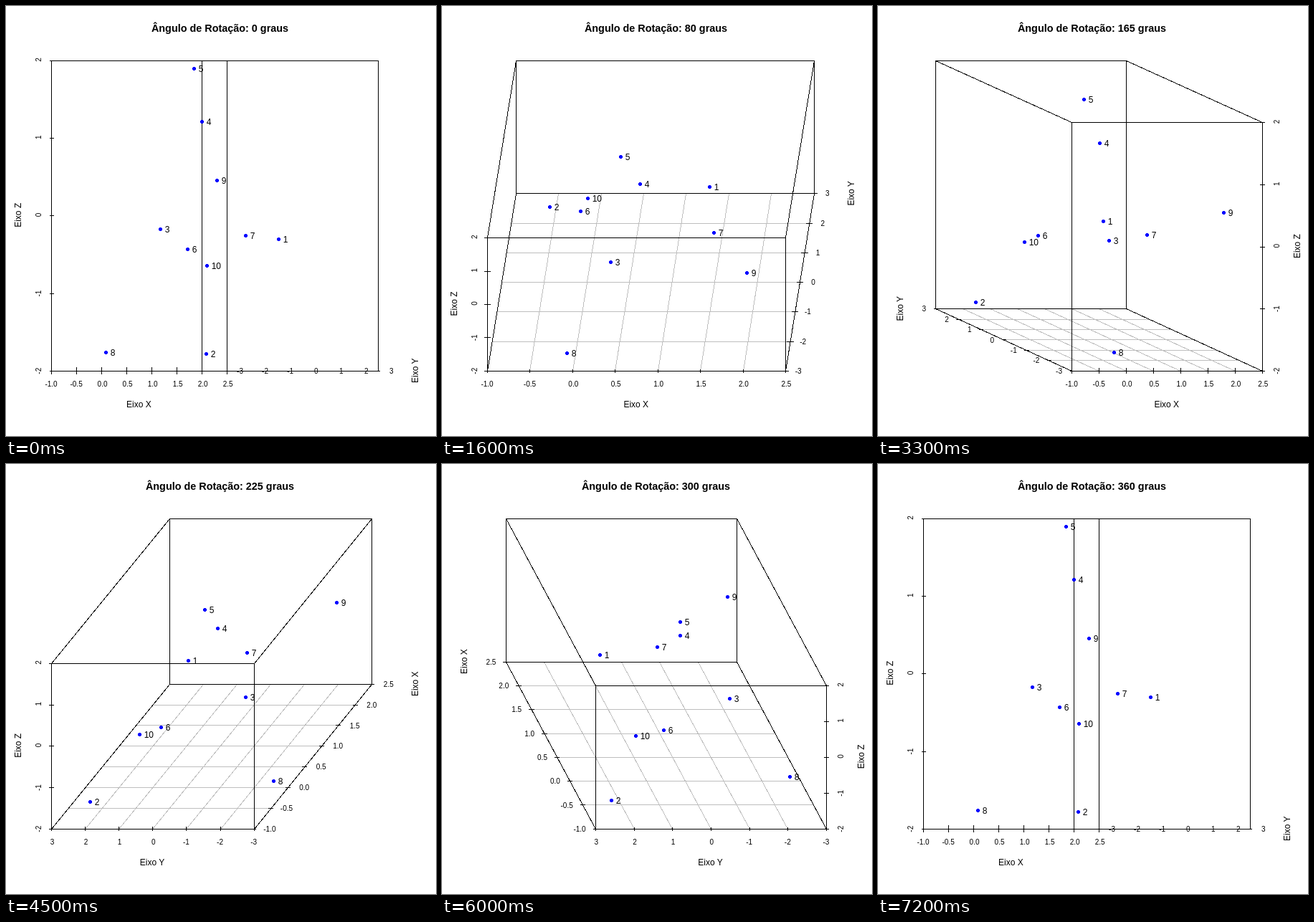
An HTML page for the animation above (7.3 s loop, 600x600 px).

```html
<!DOCTYPE html>
<html lang="pt">
<head>
<meta charset="utf-8">
<style>
  html, body { margin: 0; height: 100%; overflow: hidden; background: #fff; }
  svg { display: block; }
  path { fill: none; stroke: #000; stroke-linecap: square; shape-rendering: crispEdges; }
  .grid { stroke: #bebebe; }
  circle { fill: #00f; shape-rendering: crispEdges; }
  text { font: 12px "Liberation Sans", Arial, sans-serif; white-space: pre; }
  .tick { font-size: 10px; }
  .title { font-size: 14.4px; font-weight: bold; }
</style>
</head>
<body>
<svg id="plot" width="600" height="600"></svg>
<script>
const plot = document.getElementById('plot');
const LEFT = 63.56, RIGHT = 536.44, TOP = 76.36, BOTTOM = 509.24;
const FRAME_MS = 100, FRAMES = 73, STEP = 5;

// x in half units above -1, y and z in data units
const points = [
  [4.734, 1.311, -0.302], [0.873, 2.290, -1.781], [2.721, -1.385, -0.173],
  [3.276, -0.285, 1.213], [2.815, -0.138, 1.897], [1.781, 0.640, -0.432],
  [5.017, -0.285, -0.256], [1.826, -2.659, -1.762], [6.035, -2.444, 0.456],
  [1.867, 1.324, -0.644]
];

const range = n => Array.from({ length: n + 1 }, (_, i) => i);
const pad = s => (s[0] === '-' ? s : ' ' + s);
const xLabels = range(7).map(i => pad((i / 2 - 1).toFixed(1)));
const yLabels = range(6).map(i => pad(String(i - 3)));
const zLabels = range(4).map(i => pad(String(i - 2)));

const snap = v => Math.floor(v) + 0.5;
const line = (a, b) => `M${a.map(snap)}L${b.map(snap)}`;
const text = (s, x, y, anchor = 'middle', cls = '') =>
  `<text x="${x}" y="${y}" text-anchor="${anchor}" class="${cls}">${s}</text>`;
const upright = (s, x, y, cls = '') =>
  `<text transform="translate(${x} ${y}) rotate(-90)" text-anchor="middle" class="${cls}">${s}</text>`;

function render(degrees) {
  const turn = (degrees % 360) / 90;
  const swapped = turn > 2;              // x and y trade places
  const [width, depth] = swapped ? [6, 7] : [7, 6];
  const skew = (swapped ? 3 : 1) - turn; // rightward shift per depth step
  const rise = Math.abs(turn < 1 ? turn : turn > 3 ? turn - 4 : 2 - turn);
  const leftSide = skew < 0;             // depth axis on the left

  const full = RIGHT - LEFT;
  const span = full * full / (full + (swapped ? 27 : 18));
  const unitX = span / (width + Math.abs(skew) * depth);
  const unitZ = (BOTTOM - TOP) / (4 + rise * depth);
  const originX = leftSide ? RIGHT - width * unitX : LEFT;
  // a: along the front, b: into depth, c: height above the floor
  const at = (a, b, c) => [originX + (a + skew * b) * unitX, BOTTOM - (c + rise * b) * unitZ];

  let grid = '', lines = '', labels = '', dots = '';
  const frontLabels = swapped ? [...yLabels].reverse() : xLabels;
  const depthLabels = swapped ? xLabels : yLabels;
  const depthSide = leftSide ? 0 : width, zSide = width - depthSide;
  const tick = width / 100;

  for (const i of range(width)) {
    grid += line(at(i, 0, 0), at(i, depth, 0));
    lines += line(at(i, 0, -0.04), at(i, 0, 0.04));
    labels += text(frontLabels[i], at(i, 0, 0)[0] - 0.5, 531, 'middle', 'tick');
  }
  for (const i of range(depth)) {
    grid += line(at(0, i, 0), at(width, i, 0));
    lines += line(at(depthSide - tick, i, 0), at(depthSide + tick, i, 0));
    const [x, y] = at(depthSide, i, 0);
    labels += text(depthLabels[i], x + (leftSide ? -13.7 : 13.2), Math.round(y + 3.6),
      leftSide ? 'end' : 'start', 'tick');
  }
  for (const i of range(4)) {
    lines += line(at(zSide - tick, 0, i), at(zSide + tick, 0, i));
    labels += upright(zLabels[i], leftSide ? 560 : 49, at(0, 0, i)[1], 'tick');
  }

  // the twelve edges of the box
  for (const p of [0, 1]) for (const q of [0, 1]) {
    const a = p * width, b = q * depth;
    lines += line(at(0, b, p * 4), at(width, b, p * 4))
      + line(at(a, 0, q * 4), at(a, depth, q * 4))
      + line(at(a, b, 0), at(a, b, 4));
  }

  const [frontName, depthName] = swapped ? ['Eixo Y', 'Eixo X'] : ['Eixo X', 'Eixo Y'];
  labels += text(frontName, at(width / 2, 0, 0)[0] - 0.8, 560)
    + upright(depthName, leftSide ? 35 : 575, at(0, depth, 0)[1] - 0.5)
    + upright('Eixo Z', leftSide ? 589 : 21, at(0, 0, 2)[1] - 1)
    + text(`Ângulo de Rotação: ${degrees} graus`, 298.5, 36, 'middle', 'title');

  points.forEach(([x, y, z], i) => {
    const [px, py] = swapped ? at(3 - y, x, z + 2) : at(x, y + 3, z + 2);
    dots += `<circle cx="${snap(px)}" cy="${snap(py)}" r="2.5"/>`
      + text(i + 1, snap(px) + 6.2, Math.round(snap(py) + 4.4), 'start');
  });

  plot.innerHTML = `<path class="grid" d="${grid}"/><path d="${lines}"/>${labels}${dots}`;
}

let shown = -1;
function loop() {
  const step = Math.floor(performance.now() / FRAME_MS) % FRAMES;
  if (step !== shown) render((shown = step) * STEP);
  requestAnimationFrame(loop);
}
loop();
</script>
</body>
</html>
```
